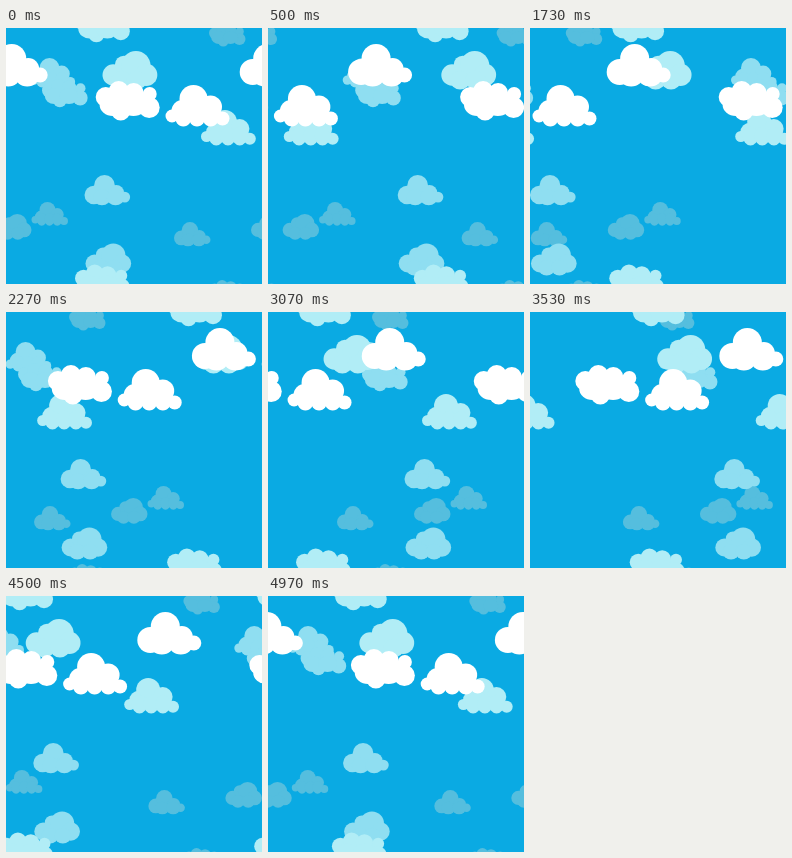
Recreate the animation shown at these times as an HTML page. Size 256x256 px, loop 5 s.

```html
<!DOCTYPE html>
<html lang="en">
<head>
<meta charset="utf-8">
<title>Drifting clouds</title>
<style>
  html, body { margin: 0; width: 100%; height: 100%; overflow: hidden; background: #0aaae3; }
  svg { display: block; width: 100%; height: 100%; }
</style>
</head>
<body>
<svg id="sky" viewBox="0 0 256 256"></svg>
<script>
const SIZE = 256, LOOP = 5000, STEPS = 150;

// Lobes are circles [x, y, radius] in a box 64 wide; the belly is a row of
// shallow scallops between left and right that closes the underside.
const shapes = {
  peak: {
    lobes: [[6.5, 31, 6.5], [17, 26, 11], [28, 14, 14], [45, 22, 11.5], [57, 33.5, 7]],
    belly: { count: 3, left: 11, right: 52, bottom: 41.5 }
  },
  dome: {
    lobes: [[13, 28, 13], [28, 14.5, 14.5], [44.5, 25, 11], [56.5, 31, 7.5]],
    belly: { count: 2, left: 15, right: 53, bottom: 42.5 }
  },
  lumpy: {
    lobes: [[10, 16, 10], [23, 10, 10], [38, 12, 10], [54, 13, 7], [53.5, 26.5, 10.5], [25, 30, 9.5]],
    belly: { count: 2, left: 7, right: 48, bottom: 35 }
  },
  puff: {
    lobes: [[12.5, 28, 12.5], [25, 16, 10.5], [39, 17, 17], [51, 28, 13]],
    belly: { count: 2, left: 13, right: 49, bottom: 45 }
  }
};

// Back to front: each layer is larger, whiter and one lap per loop faster.
const layers = [
  { color: '#55bede', clouds: [['peak', 25.5, 174], ['puff', 245, 186], ['dome', 168, 194], ['lumpy', 203, 252]] },
  { color: '#8fdef1', clouds: [['peak', 23.5, 30], ['lumpy', 36, 51], ['dome', 78.5, 147], ['puff', 79.5, 215.5]] },
  { color: '#b1edf6', clouds: [['puff', 96.5, 23], ['peak', 195, 82], ['lumpy', 69, 236.5]] },
  { color: '#ffffff', clouds: [['dome', 233.7, 16], ['lumpy', 89.7, 53], ['peak', 159.5, 57]] }
];

const sky = document.getElementById('sky');

function add(parent, tag, attrs) {
  const node = document.createElementNS('http://www.w3.org/2000/svg', tag);
  for (const key in attrs) node.setAttribute(key, attrs[key]);
  return parent.appendChild(node);
}

function drawCloud(parent, { lobes, belly }, transform) {
  const cloud = add(parent, 'g', { transform });
  // The polygon through the lobe centres fills the inside.
  add(cloud, 'polygon', { points: lobes.map(([x, y]) => `${x},${y}`).join(' ') });
  for (const [cx, cy, r] of lobes) add(cloud, 'circle', { cx, cy, r });

  const step = (belly.right - belly.left) / belly.count;
  const ry = 11;
  for (let i = 0; i < belly.count; i++) {
    add(cloud, 'ellipse', {
      cx: belly.left + (i + 0.5) * step, cy: belly.bottom - ry, rx: step * 0.65, ry
    });
  }
}

layers.forEach((layer, depth) => {
  const scale = 0.57 + depth * 0.1433;
  layer.laps = depth + 1;
  layer.group = add(sky, 'g', { fill: layer.color });
  // Repeated tiles make the layer wrap in both directions.
  for (const dx of [-2 * SIZE, -SIZE, 0]) {
    for (const dy of [-SIZE, 0]) {
      for (const [shape, x, y] of layer.clouds) {
        drawCloud(layer.group, shapes[shape], `translate(${x + dx} ${y + dy}) scale(${scale})`);
      }
    }
  }
});

// Three steps per 100 ms, held for 30, 40 and 30 ms.
function stepAt(ms) {
  const rest = ms % 100;
  return 3 * Math.floor(ms / 100) + (rest >= 70 ? 2 : rest >= 30 ? 1 : 0);
}

function render(ms) {
  const progress = stepAt(ms % LOOP) / STEPS;
  for (const { group, laps } of layers) {
    const shift = (progress * laps * SIZE) % SIZE;
    group.setAttribute('transform', `translate(${shift.toFixed(2)} 0)`);
  }
}

const start = performance.now();
function tick() {
  render(performance.now() - start);
  requestAnimationFrame(tick);
}
tick();
</script>
</body>
</html>
```
